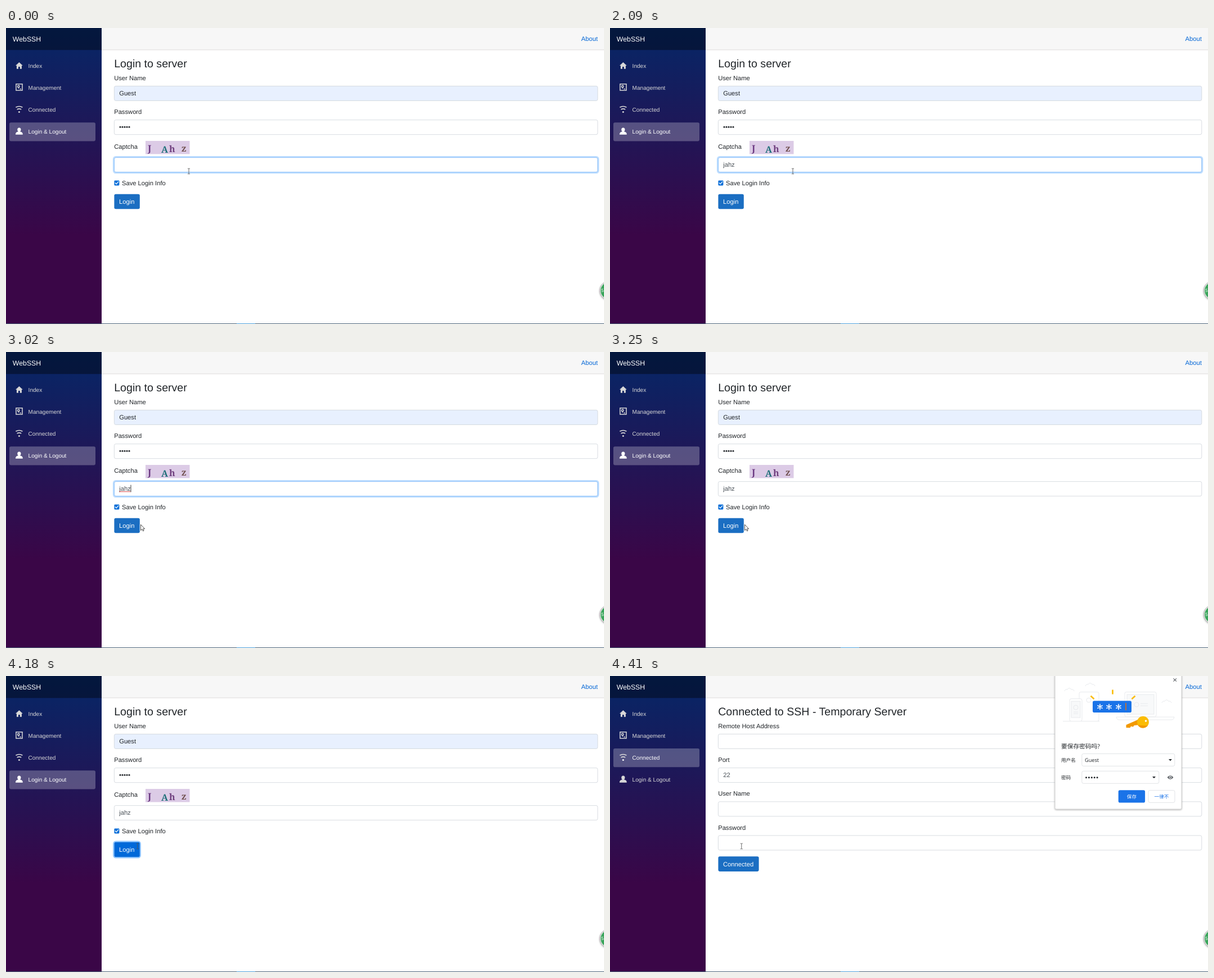
These frames come from a looping animation (1063 px wide and 527 px high, 6360 ms). An HTML page:

```html
<!DOCTYPE html>
<html lang="en">
<head>
<meta charset="utf-8">
<title>WebSSH</title>
<style>
html, body { margin: 0; height: 100%; overflow: hidden; background: #fff; }
svg { display: block; width: 100vw; height: 100vh; text-rendering: geometricPrecision;
  font: 11.2px "Liberation Sans", Arial, sans-serif; fill: #212529; }
.field { fill: #fff; stroke: #ced4da; stroke-width: .8; }
.popup { font: 8.6px "Open Sans", "Noto Sans CJK SC", "Noto Sans CJK", sans-serif; }
.popup .box { fill: #fff; stroke: #dadce0; stroke-width: .8; }
.art { fill: none; stroke: #e8eaed; stroke-width: 1; }
.line { fill: none; stroke-linecap: round; }
</style>
</head>
<body>
<svg id="stage" viewBox="0 0 1063 527" preserveAspectRatio="none"></svg>
<script>
const stage = document.getElementById('stage');
const text = (x, y, s, attrs = '') => `<text x="${x}" y="${y}" ${attrs}>${s}</text>`;
const rect = (x, y, w, h, attrs = '', r = 2.8) =>
  `<rect x="${x}" y="${y}" width="${w}" height="${h}" rx="${r}" ${attrs}/>`;
const path = (d, attrs = '') => `<path d="${d}" ${attrs}/>`;
const circle = (x, y, r, attrs = '') => `<circle cx="${x}" cy="${y}" r="${r}" ${attrs}/>`;
const dots = (x, y, gap, r) => [0, 1, 2, 3, 4].map(i => circle(x + i * gap, y, r)).join('');
const field = (y, attrs = '') => rect(192.4, y + .4, 859.4, 26, `class="field" ${attrs}`);
const title = s => text(192.2, 70, s, 'font-size="19.6"');
const label = (y, s) => text(192.2, y, s);
const button = (y, w, s, id) => rect(192.4, y, w, 26.6, `fill="#1b6ec2" ${id}`) +
  text(201, y + 17.2, s, 'fill="#fff"');

const icons = [
  path('M17 67 23.4 61 29.8 67H27.9V72.8H24.8V69H22V72.8H18.9V67Z'),
  path('M17.9 99.8H29V111H17.9ZM20.6 104a1.7 1.7 0 1 1 3.4 0q0 1-1.7 3-1.7-2-1.7-3M24.5 108.6H27', 'fill="none" stroke="#d7d7d7" stroke-width="1.5"'),
  path('M17.4 141.2q6-3.4 12 0M19.6 145q3.8-2.2 7.6 0', 'fill="none" stroke="#d7d7d7" stroke-width="1.7"') + circle(23.4, 149.4, 1.5),
  path('M23.4 177.4c4.2 0 3.6 5.6 1.4 7.2 3.4.6 5 1.6 5 5.2H17c0-3.6 1.6-4.6 5-5.2-2.2-1.6-2.8-7.2 1.4-7.2Z')
];
const nav = active => rect(6, 50.6 + 39.2 * active, 153, 33.2, 'fill="#fff" fill-opacity=".25"') +
  ['Index', 'Management', 'Connected', 'Login &amp; Logout'].map((s, i) =>
    `<g fill="${i == active ? '#fff' : '#d7d7d7'}">${icons[i]}${text(39.6, 70.5 + 39.2 * i, s, 'font-size="10.08"')}</g>`).join('');

const captcha = rect(248, 201, 78.5, 23.5, 'fill="#dccbe6"', 0) +
  [['J', 252, 220, '#6d3b83'], ['A', 276, 222, '#1d6f78'], ['h', 290, 221, '#70407f'], ['z', 312, 220, '#70504f']]
    .map(([s, x, y, c]) => text(x, y, s, `fill="${c}" font-family="Noto Serif, serif" font-weight="bold" font-size="16"`)).join('');

const loginPage = nav(3) + title('Login to server') +
  label(93, 'User Name') + field(103, 'style="fill:#e8f0fe"') + text(201.2, 120, 'Guest') +
  label(153.3, 'Password') + field(163.3) + dots(203, 176.2, 4, 1.5) +
  label(215.4, 'Captcha') + captcha + field(230.2) +
  `<g id="focus" fill="none">${rect(191, 229.2, 862.2, 28.8, 'stroke="#bfdeff" stroke-width="2.3"', 4)}
  ${rect(192.4, 230.6, 859.4, 26, 'stroke="#80bdff" stroke-width=".9"')}</g>` +
  text(201.2, 247, '', 'id="typed" fill="#495057"') +
  path('M201 248.7H221.5', 'id="spelling" stroke="#dc4a4a" stroke-width="1"') +
  rect(0, 236.6, .9, 12.8, 'id="caret" fill="#222"', 0) +
  rect(192.4, 271.4, 9, 9, 'fill="#0b6fd8"', 1.4) +
  path('M194.3 276 196.1 277.9 199.6 273.8', 'class="line" stroke="#fff" stroke-width="1.3"') +
  text(206, 280.2, 'Save Login Info') +
  rect(191.2, 294.7, 47.6, 28.6, 'id="ring" fill="none" stroke="#92c7ff" stroke-width="2.3"', 4) +
  button(295.7, 45.4, 'Login', 'id="login"');

const sshPage = nav(2) + title('Connected to SSH - Temporary Server') +
  ['Remote Host Address', 'Port', 'User Name', 'Password'].map((s, i) =>
    label(93 + 60.2 * i, s) + field(103 + 60.2 * i)).join('') +
  text(201.2, 180.2, '22', 'fill="#495057"') + button(321.3, 72.2, 'Connected', '');

const cloud = (x, y) => path(`M${x} ${y}q1-4 5-3 3-5 7 0 4-1 5 3`);
const star = (x, y) => path(`M${x} ${y - 4.6}v9.2M${x - 4} ${y - 2.3}l8 4.6M${x - 4} ${y + 2.3}l8-4.6`, 'class="line" stroke="#fff" stroke-width="1.6"');
const down = (x, y) => path(`M${x - 3} ${y - 1.5}h6l-3 3.2Z`);
const popup = rect(791, -3, 225, 240, 'fill="#fff" stroke="#c4c4c4" stroke-width=".8" filter="url(#shadow)"', 2) +
  path('M1001.5 4.3l5.4 5.4M1001.5 9.7l5.4-5.4', 'stroke="#5f6368" stroke-width="1.2"') +
  `<g class="art">${cloud(808, 27)}${cloud(845, 18)}${cloud(981, 48)}
  ${rect(834, 28.5, 35, 52, '')}${rect(817, 40.5, 22, 40, 'fill="#fff"')}${rect(820, 45, 16, 29, 'fill="#f8f9fa"', 0)}
  ${circle(828, 56, 4)}${path('M824 64h8M824 67h8M805 80.5h65')}${circle(851, 43, 4)}
  ${rect(915, 28.5, 56, 44, 'fill="#fff"')}${rect(919, 33, 48, 35, 'fill="#f8f9fa"', 0)}
  ${circle(936, 51, 4)}${path('M943 49h13M943 53h13M900 73h103q-1 5-5 5h-93q-4 0-5-5Z', 'fill="#fff"')}</g>` +
  path('M893.5 24.5v8M854.5 35.5l6 5.5M927.5 41l6-5.5', 'stroke="#fbbc04" stroke-width="2.6"') +
  rect(858, 44.3, 69, 20.7, 'fill="#1a73e8"') + star(871, 55) + star(887, 55) + star(904, 55) +
  path('M917 48v13', 'stroke="#e8710a" stroke-width="1.5"') +
  path('M938 78 917.5 87v5l7 .2 1.5-2.8 4 1 1.5-2.5 9-1Z', 'fill="#f29900"') +
  circle(947.5, 82, 10.5, 'fill="#fbbc04"') + path('M938 87a10.5 10.5 0 0 0 18 1Q949 89 938 87', 'fill="#f29900"') +
  circle(952.5, 80, 1.8, 'fill="#fff"') +
  text(802, 129, '要保存密码吗?', 'font-size="10.7"') +
  text(802, 153, '用户名') + rect(838.8, 138.4, 165, 22, 'class="box"') + text(844, 153, 'Guest', 'font-size="9.2"') + down(996, 149.5) +
  text(802, 184, '密码') + rect(838.8, 169.3, 137, 22, 'class="box"') + dots(846.5, 180.8, 4.9, 1.5) + down(967, 180.5) +
  path('M990.5 180.4q5.5-7 11 0-5.5 7-11 0Z', 'fill="#5f6368"') + circle(996, 180.4, 2.3, 'fill="#fff"') + circle(996, 180.4, 1.4, 'fill="#5f6368"') +
  rect(903.7, 203.2, 47.4, 22.3, 'fill="#1a73e8"') + text(927.4, 217.5, '保存', 'fill="#fff" text-anchor="middle"') +
  rect(957, 203.6, 47, 21.7, 'class="box"') + text(980.5, 217.5, '一律不', 'fill="#1a73e8" text-anchor="middle"');

const pointers = {
  beam: path('M-2-4.8h1.4l.6.5.6-.5H2M-2 4.8h1.4l.6-.5.6.5H2M0-4.3v8.6', 'fill="none" stroke="#555" stroke-width=".9"'),
  arrow: path('M0 0V10.4L2.4 8.3 4 11.6 5.6 10.9 4.1 7.6H7.2Z', 'fill="#fff" stroke="#222" stroke-width=".8"'),
  hand: path('M-1.1 7V.9a1.1 1.1 0 0 1 2.2 0V4.6l3.4.8q1.1.4.9 2L4.6 10.4V12.6H-1V11.2L-4 7.8q.2-1.6 1.6-.9Z', 'fill="#fff" stroke="#222" stroke-width=".8"')
};

stage.innerHTML = `<defs>
  <linearGradient id="side" x2="0" y2="1"><stop stop-color="#052767"/><stop offset=".7" stop-color="#3a0647"/></linearGradient>
  <filter id="shadow"><feDropShadow dx="0" dy="1" stdDeviation="1.5" flood-opacity=".35"/></filter></defs>` +
  rect(0, 0, 1063, 527, 'fill="#fff"', 0) + rect(170, 0, 893, 39.2, 'fill="#f7f7f7"', 0) +
  path('M170 38.9H1063', 'stroke="#d6d5d5" stroke-width=".8"') +
  rect(0, 0, 170, 527, 'fill="url(#side)"', 0) + rect(0, 0, 170, 39.2, 'fill-opacity=".4" style="fill:#000"', 0) +
  text(11.8, 24, 'WebSSH', 'fill="#fff" font-size="12.32"') + text(1022.5, 23, 'About', 'fill="#0366d6"') +
  `<g id="loginPage">${loginPage}</g><g id="sshPage">${sshPage}</g>` +
  circle(1072, 467.5, 16.5, 'fill="#eee" stroke="#aaa" filter="url(#shadow)"') + circle(1072, 467.5, 15, 'fill="#3ba55c"') +
  text(1058, 470, '5', 'fill="#fff" font-size="8"') +
  rect(0, 526, 1063, 1, 'fill="#4a6378"', 0) + rect(410, 526, 33, 1, 'fill="#4b9fdc"', 0) +
  `<g id="popup" class="popup">${popup}</g><g id="pointer"></g>`;

const el = Object.fromEntries([...stage.querySelectorAll('[id]')].map(e => [e.id, e]));
const show = (e, on) => e.style.display = on ? '' : 'none';
const ramp = (v, a, b) => Math.min(1, Math.max(0, (v - a) / (b - a)));
const mix = (a, b, u) => a + (b - a) * u;

// tick, x, y
const route = [[-1, 325, 255], [2, 299, 271], [4, 266, 293], [6, 243, 309], [8, 239.5, 307.2],
  [11, 239.5, 307.2], [14, 236, 305], [17, 235, 304.5], [18, 233.8, 303]];
function pointerAt(tick) {
  const i = route.findIndex(p => p[0] >= tick);
  if (i < 0) return route[route.length - 1].slice(1);
  if (i == 0) return route[0].slice(1);
  const a = route[i - 1], b = route[i], u = ramp(tick, a[0], b[0]);
  return [mix(a[1], b[1], u), mix(a[2], b[2], u)];
}

const keyTimes = [910, 1160, 1390, 1540];
const caretX = [201.2, 203.7, 209.9, 216.1, 221.5];

function draw(t) {
  // pointer and page run on a clock of about 13 ticks per second
  const tick = Math.max(-1, Math.floor((t - 2410) / 76.7 + .1));
  const typed = keyTimes.filter(k => t >= k).length;
  const connected = tick >= 24;
  show(el.loginPage, !connected);
  show(el.sshPage, connected);

  el.typed.textContent = 'jahz'.slice(0, typed);
  el.caret.setAttribute('x', caretX[typed]);
  show(el.caret, t >= 130 && t < 610 || t >= 910 && t < 2090 || tick >= 3 && tick < 9);
  show(el.spelling, tick >= 3 && tick < 9);
  el.focus.style.opacity = 1 - ramp(tick, 8, 11);

  const hover = ramp(tick, 12, 14);
  el.login.style.fill = `rgb(${mix(27, 0, hover)},${mix(110, 105, hover)},${mix(194, 217, hover)})`;
  el.ring.style.opacity = ramp(tick, 20, 22);

  const open = [.36, .82, 1][Math.min(2, tick - 24)] || 0;
  const scale = mix(.944, 1, open);
  show(el.popup, connected);
  el.popup.style.opacity = open;
  el.popup.setAttribute('transform', `translate(903.5 118) scale(${scale}) translate(-903.5 -118)`);

  const kind = tick < 1 || tick >= 23 ? 'beam' : tick < 13 ? 'arrow' : 'hand';
  if (el.pointer.dataset.kind != kind) {
    el.pointer.innerHTML = pointers[kind];
    el.pointer.dataset.kind = kind;
  }
  el.pointer.setAttribute('transform', `translate(${pointerAt(tick)})`);
}

const start = performance.now();
function frame() {
  draw((performance.now() - start) % 6360);
  requestAnimationFrame(frame);
}
frame();
</script>
</body>
</html>
```
